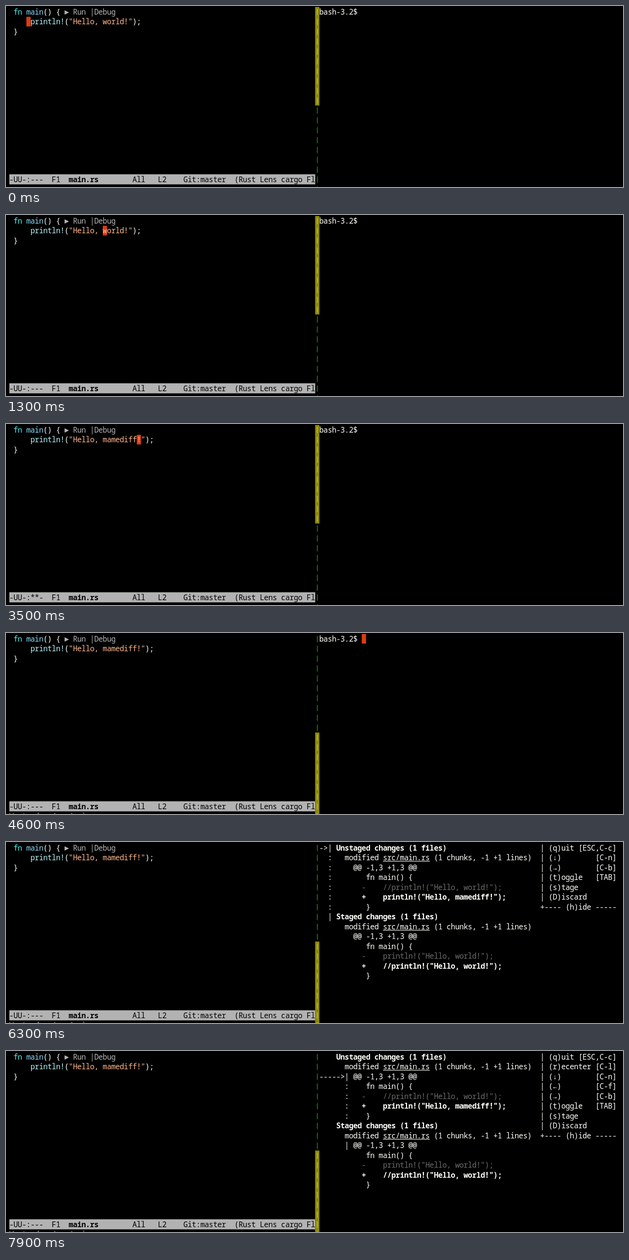
An HTML page with a canvas that plays this animation: 1280x377 px, repeating every 8 s.

```html
<!DOCTYPE html>
<html lang="en">
<head>
<meta charset="utf-8">
<title>Editor and diff viewer</title>
<style>
html, body { margin: 0; width: 1280px; height: 377px; overflow: hidden; background: #000; }
canvas { display: block; }
</style>
</head>
<body>
<canvas id="stage" width="1280" height="377"></canvas>
<script>
const ctx = document.getElementById('stage').getContext('2d');
ctx.textAlign = 'center';
const CW = 8.81, RH = 20.53, TOP = 2;
const LEFT = 7, RIGHT = 650, LOOP = 8000;
const WHITE = '#fffff8', GRAY = '#b4b4b4', DIM = '#6c6c6c', RED = '#dc3c14';
const STRING = '#ffb78a';
const WORD = 'mamediff';
const KILL = 1900, TYPE = 2400, SAVE = 4100, SWITCH = 4600, COMMAND = 5000, OPEN = 6200;

const rowY = row => TOP + row * RH;

function rect(x, y, w, h, color) {
  ctx.fillStyle = color;
  ctx.fillRect(x, y, w, h);
}

// Writes on the character grid and returns the column after the text.
function put(x, col, row, text, color = WHITE, weight = 500) {
  ctx.font = `${weight} 15.5px "Noto Sans Mono", "DejaVu Sans Mono", monospace`;
  ctx.fillStyle = color;
  for (const ch of text) ctx.fillText(ch, x + CW * (col++ + 0.5), rowY(row) + 15.6);
  return col;
}

const cursor = (x, col, row) => rect(x + col * CW, rowY(row), CW, RH - 0.5, RED);

// Number of keys pressed so far when typing starts at the given time.
const typed = (t, start) => Math.max(0, Math.min(WORD.length, Math.floor((t - start) / 130) + 1));

function cursorCol(t) {
  if (t < 1000) return 4;
  if (t < 1100) return 12;
  if (t < 1200) return 20;
  if (t < 1300) return 21;
  return 22 + typed(t, TYPE);
}

function editor(t) {
  const name = t < KILL ? 'world' : WORD.slice(0, typed(t, TYPE));
  if (t < SWITCH) cursor(LEFT, cursorCol(t), 1);
  put(LEFT, 1, 0, 'fn', '#4df6f6');
  put(LEFT, 4, 0, 'main', '#8ad8f8');
  put(LEFT, 8, 0, '() {');
  put(LEFT, 13, 0, '▶ Run |Debug', GRAY);
  let col = put(LEFT, 5, 1, 'println!', '#b4f0f4');
  col = put(LEFT, col, 1, '(');
  col = put(LEFT, col, 1, `"Hello, ${name}!"`, STRING);
  put(LEFT, col, 1, ');');
  put(LEFT, 1, 2, '}');

  rect(LEFT, 350.5, 634.5, 21, '#b2b2b2');
  const flag = t >= KILL && t < SAVE ? '**-' : '---';
  put(LEFT, 0, 17, `-UU-:${flag}  F1`, '#000');
  put(LEFT, 14, 17, 'main.rs', '#000', 800);
  put(LEFT, 29, 17, 'All   L2    Git:master  (Rust Lens cargo Fl', '#000');
  if (t >= SAVE) put(LEFT, 0, 18, 'Wrote demo/src/main.rs', GRAY);
}

function divider(t) {
  const split = rowY(10);
  const lower = t >= SWITCH;
  rect(641.3, lower ? split : TOP, 8.8, lower ? 377 - split : split - TOP, '#8f8a00');
  for (let row = 0; row < 19; row++) {
    const active = row >= 10 === lower;
    rect(645, rowY(row) + 4, 1.5, 13, active ? '#b4b4a0' : '#089808');
  }
}

function shell(t) {
  const command = WORD.slice(0, t < COMMAND ? 0 : typed(t, COMMAND));
  const col = put(RIGHT, 0, 0, 'bash-3.2$ ' + command);
  if (t >= SWITCH) cursor(RIGHT, col, 0);
}

function section(row, title, removed, added) {
  put(RIGHT, 4, row, `${title} changes (1 files)`, WHITE, 800);
  put(RIGHT, 6, row + 1, 'modified src/main.rs (1 chunks, -1 +1 lines)');
  rect(RIGHT + 15 * CW, rowY(row + 1) + 17, 11 * CW, 1.2, WHITE);
  put(RIGHT, 8, row + 2, '@@ -1,3 +1,3 @@');
  put(RIGHT, 11, row + 3, 'fn main() {');
  put(RIGHT, 10, row + 4, '-    ' + removed, DIM);
  put(RIGHT, 10, row + 5, '+    ' + added, WHITE, 800);
  put(RIGHT, 11, row + 6, '}');
}

function menu(level) {
  const items = [['(q)uit', '[ESC,C-c]']];
  if (level) items.push(['(r)ecenter', '[C-l]']);
  items.push(['(↓)', '[C-n]']);
  if (level) items.push(['(←)', '[C-f]']);
  items.push(['(→)', '[C-b]'], ['(t)oggle', '[TAB]'], ['(s)tage', ''], ['(D)iscard', '']);
  items.forEach(([label, key], row) => {
    put(RIGHT, 52, row, '| ' + label + key.padStart(16 - label.length));
  });
  put(RIGHT, 52, items.length, '+---- (h)ide -----');
}

function diff(t) {
  const level = t < 6900 ? 0 : t < 7500 ? 1 : 2;
  const hello = 'println!("Hello, world!");';
  section(0, 'Unstaged', '//' + hello, `println!("Hello, ${WORD}!");`);
  section(7, 'Staged', hello, '//' + hello);
  const mark = 2 + 2 * level;
  put(RIGHT, 0, level, '>|'.padStart(mark + 1, '-'));
  for (let row = level + 1; row < 7; row++) put(RIGHT, mark, row, ':');
  put(RIGHT, mark, 7 + level, '|');
  menu(level);
}

function draw() {
  const t = performance.now() % LOOP;
  rect(0, 0, 1280, 377, '#000');
  editor(t);
  divider(t);
  (t < OPEN ? shell : diff)(t);
  requestAnimationFrame(draw);
}
draw();
</script>
</body>
</html>
```
